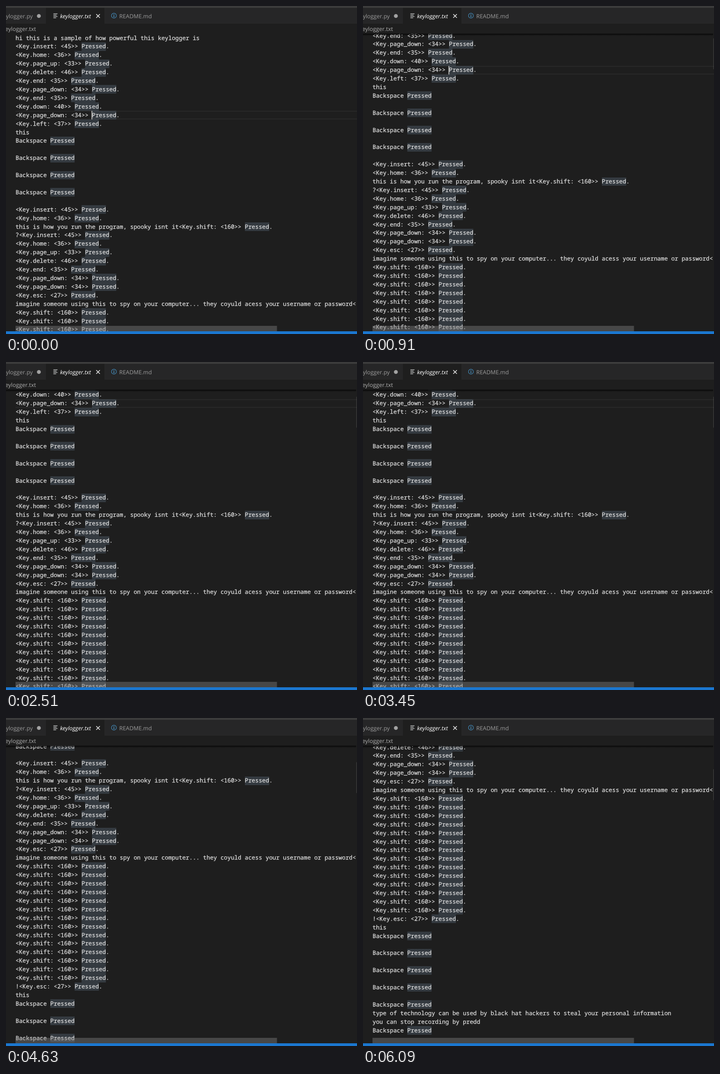
An HTML page with a canvas for the animation above (8000 ms loop, 774 by 723 pixels).

```html
<!DOCTYPE html>
<html lang="en">
<head>
<meta charset="utf-8">
<title>Editor scroll</title>
<style>
  html, body { margin: 0; width: 100%; height: 100%; overflow: hidden; background: #1e1e1e; }
  canvas { display: block; }
</style>
</head>
<body>
<canvas id="stage" width="774" height="723"></canvas>
<script>
const ctx = document.getElementById('stage').getContext('2d');
const W = 774, H = 723, LOOP = 8000;
const ZOOM = 0.9953;
const LINE = 19 * ZOOM, LEFT = 21, TOP = 61, BOTTOM = 717;
const CODE_FONT = '12.78px "Noto Sans Mono", "DejaVu Sans Mono", monospace';
const UI_FONT = '12.4px "Open Sans", "Noto Sans", sans-serif';
const CHAR = 7.664;
const CURSOR_LINE = 9, CURSOR_COL = 22;

// [start time, value]
const SCROLL = [[0, 0], [650, 50], [790, 100], [2510, 150], [3710, 200], [4630, 350], [5090, 450], [6090, 500]];
const CURSOR = [[0, 1], [530, 0], [910, 1], [1450, 0], [1990, 1], [2510, 0], [2930, 1], [3450, 0]];

const CODES = { insert: 45, home: 36, page_up: 33, delete: 46, end: 35, page_down: 34, down: 40, left: 37, esc: 27, shift: 160 };
const key = name => `<Key.${name}: <${CODES[name]}>> Pressed.`;
const keys = names => names.split(' ').map(key);
const backspaces = n => Array(n).fill(['Backspace Pressed', '']).flat();

const lines = [
  'hi this is a sample of how powerful this keylogger is',
  ...keys('insert home page_up delete end page_down end down page_down left'),
  'this',
  ...backspaces(4),
  ...keys('insert home'),
  'this is how you run the program, spooky isnt it' + key('shift'),
  '?' + key('insert'),
  ...keys('home page_up delete end page_down page_down esc'),
  'imagine someone using this to spy on your computer... they coyuld acess your username or password<',
  ...Array(14).fill(key('shift')),
  '!' + key('esc'),
  'this',
  ...backspaces(5).slice(0, -1),
  'type of technology can be used by black hat hackers to steal your personal information',
  'you can stop recording by predd',
  'Backspace Pressed'
];

function valueAt(steps, t) {
  let value = steps[0][1];
  for (const [start, v] of steps) if (t >= start) value = v;
  return value;
}

function rect(x, y, w, h, color) {
  ctx.fillStyle = color;
  ctx.fillRect(x, y, w, h);
}

function label(str, x, y, color, align = 'left', style = '') {
  ctx.font = style + UI_FONT;
  ctx.textAlign = align;
  ctx.fillStyle = color;
  ctx.fillText(str, x, y);
}

function stroke(color, width, ...segments) {
  ctx.strokeStyle = color;
  ctx.lineWidth = width;
  ctx.beginPath();
  for (const [x1, y1, x2, y2] of segments) {
    ctx.moveTo(x1, y1);
    ctx.lineTo(x2, y2);
  }
  ctx.stroke();
}

function circle(x, y, r) {
  ctx.beginPath();
  ctx.arc(x, y, r, 0, Math.PI * 2);
}

function drawTabs() {
  rect(0, 0, W, 4, '#3c3c3c');
  rect(0, 4, W, 35, '#262627');
  rect(88, 4, 129, 35, '#1e1e1e');

  label('keylogger.py', 59, 26.5, '#9c9c9c', 'right');
  ctx.fillStyle = '#a2a2a2';
  circle(72.5, 22, 4.3);
  ctx.fill();

  [9, 7, 9, 6].forEach((w, i) => rect(104.5, 16.5 + i * 3, w, 1.3, '#cfd2d1'));
  label('keylogger.txt', 119.3, 26.5, '#ffffff', 'left', 'italic ');
  stroke('#f0f0f0', 1.5, [199, 18, 207, 26], [207, 18, 199, 26]);

  ctx.strokeStyle = '#4289b8';
  ctx.lineWidth = 1.2;
  circle(238, 21.3, 5.4);
  ctx.stroke();
  rect(237.2, 18, 1.6, 1.6, '#4f9ccc');
  rect(237.2, 20.6, 1.6, 4, '#4f9ccc');
  label('README.md', 249.8, 26.5, '#9c9c9c');

  label('keylogger.txt', 66, 54.5, '#b0b0b0', 'right');
}

function drawLine(str, top, next) {
  const col = str.indexOf('Pressed');
  if (col >= 0) {
    const y = Math.round(top);
    rect(LEFT + col * CHAR, y, 7 * CHAR, Math.round(next) - y, 'rgba(173,214,255,0.15)');
  }
  // a hairline outline gives the glyphs a slightly heavier weight
  ctx.fillStyle = ctx.strokeStyle = '#dcdcdc';
  ctx.lineWidth = 0.3;
  ctx.fillText(str, LEFT, top + 13.5);
  ctx.strokeText(str, LEFT, top + 13.5);
}

function drawEditor(scroll, cursorOn) {
  const lineTop = i => TOP + i * LINE - scroll * ZOOM;
  ctx.save();
  ctx.beginPath();
  ctx.rect(0, TOP, W, BOTTOM - TOP);
  ctx.clip();

  const current = Math.round(lineTop(CURSOR_LINE));
  rect(21, current, W - 21, 2, '#282828');
  rect(21, current + 17, W - 21, 2, '#282828');

  ctx.font = CODE_FONT;
  ctx.textAlign = 'left';
  lines.forEach((str, i) => {
    const top = lineTop(i);
    if (top > TOP - LINE && top < BOTTOM) drawLine(str, top, lineTop(i + 1));
  });
  if (cursorOn) rect(LEFT + CURSOR_COL * CHAR - 1.1, current, 1.8, 19, '#c0c1bf');

  if (scroll > 0) {
    const shade = ctx.createLinearGradient(0, TOP, 0, TOP + 5);
    shade.addColorStop(0, 'rgba(0,0,0,0.75)');
    shade.addColorStop(1, 'rgba(0,0,0,0)');
    rect(0, TOP, 772, 5, shade);
    rect(772, TOP + scroll * 0.104, 2, 68, 'rgba(121,121,121,0.22)');
  }
  rect(21, 705, 576.5, 12, 'rgba(121,121,121,0.45)');
  ctx.restore();
}

function draw(t) {
  rect(0, 0, W, H, '#1e1e1e');
  ctx.textRendering = 'geometricPrecision';
  drawTabs();
  drawEditor(valueAt(SCROLL, t), valueAt(CURSOR, t));
  rect(0, BOTTOM, W, H - BOTTOM, '#1b77d0');
}

const begin = performance.now();
function tick() {
  draw((performance.now() - begin) % LOOP);
  requestAnimationFrame(tick);
}
tick();
</script>
</body>
</html>
```
